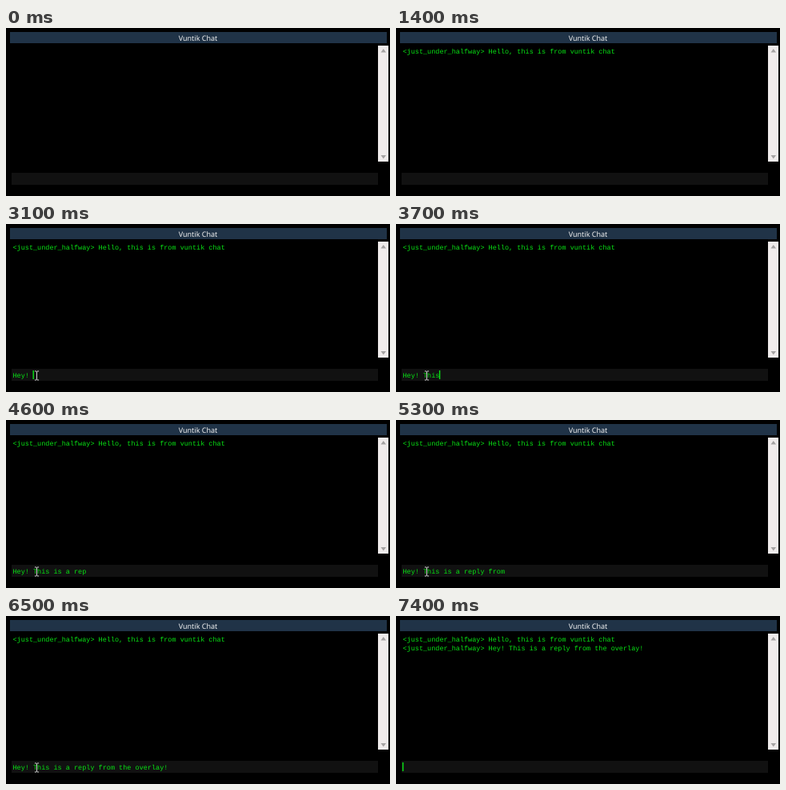
Animation of 480x210 px, one loop 7500 ms. Source, as an HTML page:

```html
<!DOCTYPE html>
<html lang="en">
<head>
<meta charset="utf-8">
<title>Chat overlay</title>
<style>
  html, body { margin: 0; width: 100%; height: 100%; overflow: hidden; background: #000; }
  svg { display: block; width: 480px; height: 210px; }
  text { text-rendering: geometricPrecision; white-space: pre; }
  .chat { font: 8.5px "Liberation Mono", monospace; fill: #08e414; }
  .title { font: 9px "Noto Sans", sans-serif; fill: #f0f0f0; text-anchor: middle; }
</style>
</head>
<body>
<svg viewBox="0 0 480 210">
  <rect width="480" height="210"/>
  <rect x="5" y="5" width="471" height="14" fill="#203347"/>
  <text class="title" x="240" y="16">Vuntik Chat</text>

  <rect x="465" y="22" width="13" height="145" fill="#f0ecec"/>
  <path d="M468.5 30.5l3.3-4.5 3.3 4.5zM468.5 159l3.3 4.5 3.3-4.5z" fill="#a5a3a3"/>
  <rect x="7" y="181" width="458" height="15" fill="#111"/>

  <g class="chat">
    <text id="first" x="8.5" y="32">&lt;just_under_halfway&gt; Hello, this is from vuntik chat</text>
    <text id="second" x="8.5" y="43"></text>
    <text id="input" x="8.5" y="192"></text>
    <rect id="caret" y="183" width="1.4" height="11"/>
  </g>
  <path id="pointer" d="M-2.6-5.5h2.1l.5.5.5-.5h2.1M0-5V5M-2.6 5.5h2.1L0 5l.5.5h2.1" fill="none" stroke="#d0d0d0"/>
</svg>
<script>
const LOOP = 7500, STEP = 100, CHAR = 5.1;
const HELLO = 900, ENTER = 1600, CLICK = 1900, SEND = 6900;
const BLINK = 530, BLINK_START = 515;
const REPLY = "Hey! This is a reply from the overlay!";
// [time, characters typed]
const TYPING = [[2200, 0], [2400, 2], [3700, 9], [3800, 9], [4300, 15],
                [4400, 15], [4600, 18], [5900, 34], [6300, 38]];

const [first, second, input, caret, pointer] =
  ["first", "second", "input", "caret", "pointer"].map(id => document.getElementById(id));
const show = (el, on) => el.setAttribute("visibility", on ? "visible" : "hidden");

second.textContent = "<just_under_halfway> " + REPLY;

function typedCount(t) {
  if (t < TYPING[0][0] || t >= SEND) return 0;
  const i = TYPING.findIndex(([time]) => time > t);
  if (i < 0) return REPLY.length;
  const [t0, n0] = TYPING[i - 1], [t1, n1] = TYPING[i];
  return Math.floor(n0 + (n1 - n0) * (t - t0) / (t1 - t0) + 1e-6);
}

function draw(now) {
  const t = Math.floor(now % LOOP / STEP) * STEP;
  const count = typedCount(t);
  const blinkOn = (t - BLINK_START) % (2 * BLINK) < BLINK;

  show(first, t >= HELLO);
  show(second, t >= SEND);
  input.textContent = REPLY.slice(0, count);
  caret.setAttribute("x", 8 + count * CHAR);
  show(caret, t >= CLICK && blinkOn);

  const away = Math.max(0, 1 - (t - ENTER) / (CLICK - ENTER)) ** 2;
  pointer.setAttribute("transform", `translate(${38.5 + 16 * away} ${189.5 + 20 * away})`);
  show(pointer, t >= ENTER && t < SEND);
  requestAnimationFrame(draw);
}
requestAnimationFrame(draw);
</script>
</body>
</html>
```
